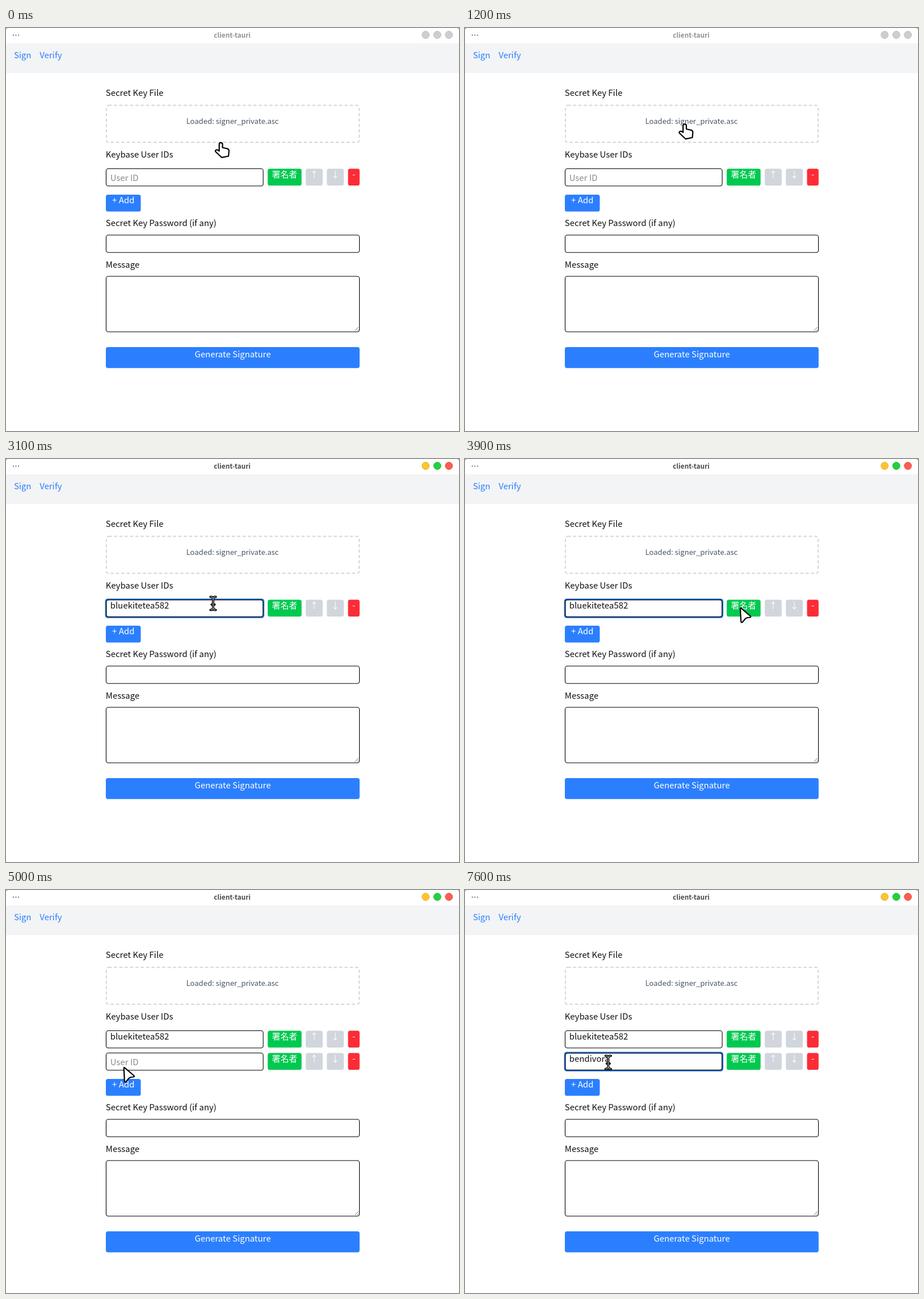
An HTML page that plays this animation: 794x706 px, repeating every 8 s.

```html
<!DOCTYPE html>
<html lang="ja">
<head>
<meta charset="utf-8">
<title>client-tauri</title>
<style>
  html, body { margin: 0; width: 100%; height: 100%; overflow: hidden; background: #fff; }
  svg { display: block; width: 794px; height: 706px; }
  text { font: 14.9px "Noto Sans CJK JP", "Noto Sans CJK", "Noto Sans", sans-serif; fill: #111; white-space: pre; }
  text.button { fill: #fff; font-weight: 500; text-anchor: middle; }
  text.link { fill: #2b7fff; }
  text.hint { fill: #8a8a8a; }
  text.title { font-size: 11.8px; font-weight: 700; text-anchor: middle; }
  text.file { font-size: 13px; fill: #4a5565; text-anchor: middle; }
  .field { fill: #fff; stroke: #000; stroke-width: 1.1; }
  .cursor { fill: #fff; stroke: #000; stroke-width: 2.2; stroke-linejoin: round; stroke-linecap: round; }
</style>
</head>
<body>
<svg id="stage" viewBox="0 0 794 706"></svg>
<script>
const LOOP = 8000, TICK = 100, ROW = 39;
const FIRST_ID = "bluekitetea582", SECOND_ID = "bendivora";
const ACTIVE_AT = 2100, PASTE_AT = 2600, ADD_AT = 5000, MOVE_AT = 5300, FOCUS_AT = 5500;
const KEY_TIMES = [6200, 6300, 6500, 6600, 6700, 7000, 7100, 7200, 7300];

// Pointer hotspot: time, x, y
const PATH = [
  [0, 377, 200], [100, 377, 200], [400, 344, 176], [700, 372, 147], [900, 408, 153],
  [1000, 399, 160], [1200, 385.5, 167.5], [1400, 371, 157], [1600, 371, 157],
  [1900, 330, 316], [2100, 304, 256], [2200, 302, 252], [2800, 302, 252],
  [3000, 358, 260], [3100, 363, 253], [3500, 363, 253], [3700, 516, 262],
  [3800, 508, 271], [3900, 482, 260], [4200, 482, 260], [4700, 191, 306],
  [4800, 206, 310], [5200, 206, 310], [5300, 212, 314], [5600, 264, 295.5],
  [7500, 264, 295.5], [7600, 251, 302], [LOOP, 251, 302]
];

const text = (x, y, str, cls = "", extra = "") =>
  `<text x="${x}" y="${y}" class="${cls}" ${extra}>${str}</text>`;
const box = (x, y, w, h, attrs) =>
  `<rect x="${x}" y="${y}" width="${w}" height="${h}" rx="3.7" ${attrs}/>`;
const button = (x, y, w, h, color, label, baseline = y + 15.5) =>
  box(x, y, w, h, `fill="${color}"`) + text(x + w / 2, baseline, label, "button");
const field = (y, w, h) => box(175.5, y, w, h, 'class="field"');

const row = (name, y) => `
  <g id="${name}">
    ${field(y, 275.3, 30.3)}
    ${text(182.7, y + 21.5, "User ID", "hint")}
    ${text(182.7, y + 15.5, "", "value")}
    ${button(458.7, y, 59.4, 29.6, "#00c950", "署名者")}
    ${button(525.4, y, 29.7, 29.6, "#d1d5dc", "↑")}
    ${button(562.4, y, 29.7, 29.6, "#d1d5dc", "↓")}
    ${button(599.5, y, 20.3, 29.6, "#fb2c36", "-")}
  </g>`;

const stage = document.getElementById("stage");
stage.innerHTML = `
  <rect width="794" height="706" fill="#fff"/>
  <path d="M0 0h4Q0 0 0 4zM794 0h-4q4 0 4 4z" fill="#999"/>
  <g fill="#555">${[12.8, 17.4, 22].map(x => `<circle cx="${x}" cy="12.5" r="1"/>`).join("")}</g>
  ${text(396.5, 17, "client-tauri", "title", 'id="title"')}
  <g id="lights">${[735.5, 756, 776.3].map(x => `<circle cx="${x}" cy="12" r="6.4"/>`).join("")}</g>
  <rect y="27" width="794" height="52" fill="#f3f4f6"/>
  ${text(13.9, 53, "Sign", "link")}
  ${text(59, 53, "Verify", "link")}
  ${text(174.8, 119.3, "Secret Key File")}
  ${box(176, 135.5, 443, 64.7, 'fill="none" stroke="#d1d5dc" stroke-width="1.9" stroke-dasharray="5.6 3.8"')}
  ${text(397, 167.6, "Loaded: signer_private.asc", "file")}
  ${text(174.8, 227, "Keybase User IDs")}
  ${row("first", 246.5)}
  ${row("second", 246.5 + ROW)}
  <g id="ring" fill="none">
    ${box(174.7, 245.5, 277, 32.2, 'stroke="#2878e6" stroke-width="2.2"')}
    ${box(175.8, 246.7, 274.7, 29.8, 'stroke="#071426" stroke-width="1.5"')}
  </g>
  <g id="lower">
    ${button(175, 292, 61.2, 29.6, "#2b7fff", "+ Add", 307)}
    ${text(174.8, 347.3, "Secret Key Password (if any)")}
    ${field(362.8, 444, 30.4)}
    ${text(174.8, 419.5, "Message")}
    ${field(435, 444, 97.3)}
    <path d="M611.5 530.5l6.5-6.5M615.5 530.5l2.5-2.5" stroke="#777" stroke-width="1"/>
    ${button(175, 559, 444.8, 36.8, "#2b7fff", "Generate Signature", 577.3)}
  </g>
  <g class="cursor">
    <path id="hand" d="M-3.3 15V3.5Q-3.3 .8 -.5 .8T2.5 3.5V9.5L10 11.2Q14 12 13.8 15.5L13 24.5L1 26.8L-9.3 17Q-11 14.5 -8.5 13.5Q-6 13 -3.3 15.5z"/>
    <path id="arrow" d="M.6 1.8Q.5 .2 2 1.3L18 15Q20 17.2 17 17.5Q11.5 17.7 9.2 20L4.5 25.6Q2 27.5 1.7 24.5z"/>
    <g id="beam" fill="none">
      <path d="M-4.5-11.5Q0-11.5 0-8Q0-11.5 4.5-11.5M0-8V8M-4.5 11.5Q0 11.5 0 8Q0 11.5 4.5 11.5M-2.5 2h5" stroke-width="4.2"/>
      <path d="M-4-11.5Q0-11.5 0-8Q0-11.5 4-11.5M0-8V8M-4 11.5Q0 11.5 0 8Q0 11.5 4 11.5" stroke="#fff" stroke-width="1"/>
    </g>
  </g>`;

const $ = id => document.getElementById(id);
const show = (el, on) => el.setAttribute("visibility", on ? "visible" : "hidden");
const shift = (el, x, y) => el.setAttribute("transform", `translate(${x} ${y})`);

function setValue(id, value, visible = true) {
  const group = $(id);
  group.querySelector(".value").textContent = value;
  show(group, visible);
  show(group.querySelector(".hint"), visible && !value);
}

function pointerAt(t) {
  const i = PATH.findIndex(p => p[0] > t);
  const [t0, x0, y0] = PATH[i - 1], [t1, x1, y1] = PATH[i];
  const k = (t - t0) / (t1 - t0);
  return [x0 + (x1 - x0) * k, y0 + (y1 - y0) * k];
}

function pointerShape(t, x, y) {
  if (y <= 201) return "hand";
  const overInput = x >= 175 && x <= 451 &&
    (y >= 246 && y <= 277 || t >= MOVE_AT && y >= 285 && y <= 316);
  return overInput ? "beam" : "arrow";
}

function render(t) {
  const active = t >= ACTIVE_AT, added = t >= ADD_AT;
  $("title").style.fill = active ? "#4a4a4a" : "#929292";
  const colors = active ? ["#fcc52f", "#24d041", "#ff5c50"] : Array(3).fill("#cecece");
  const edges = active ? ["#e8ae22", "#1fbc38", "#e84e43"] : Array(3).fill("#bdbdbd");
  [...$("lights").children].forEach((c, i) => {
    c.setAttribute("fill", colors[i]);
    c.setAttribute("stroke", edges[i]);
  });

  setValue("first", t >= PASTE_AT ? FIRST_ID : "");
  setValue("second", SECOND_ID.slice(0, KEY_TIMES.filter(k => k <= t).length), added);
  shift($("lower"), 0, added ? ROW : 0);
  show($("ring"), active && !added || t >= FOCUS_AT);
  shift($("ring"), 0, added ? ROW : 0);

  const [x, y] = pointerAt(t), shape = pointerShape(t, x, y);
  for (const id of ["hand", "arrow", "beam"]) {
    show($(id), id === shape);
    shift($(id), x, y);
  }
}

const start = performance.now();
let last = -1;
function frame() {
  const t = Math.floor((performance.now() - start) % LOOP / TICK) * TICK;
  if (t !== last) render(last = t);
  requestAnimationFrame(frame);
}
frame();
</script>
</body>
</html>
```
